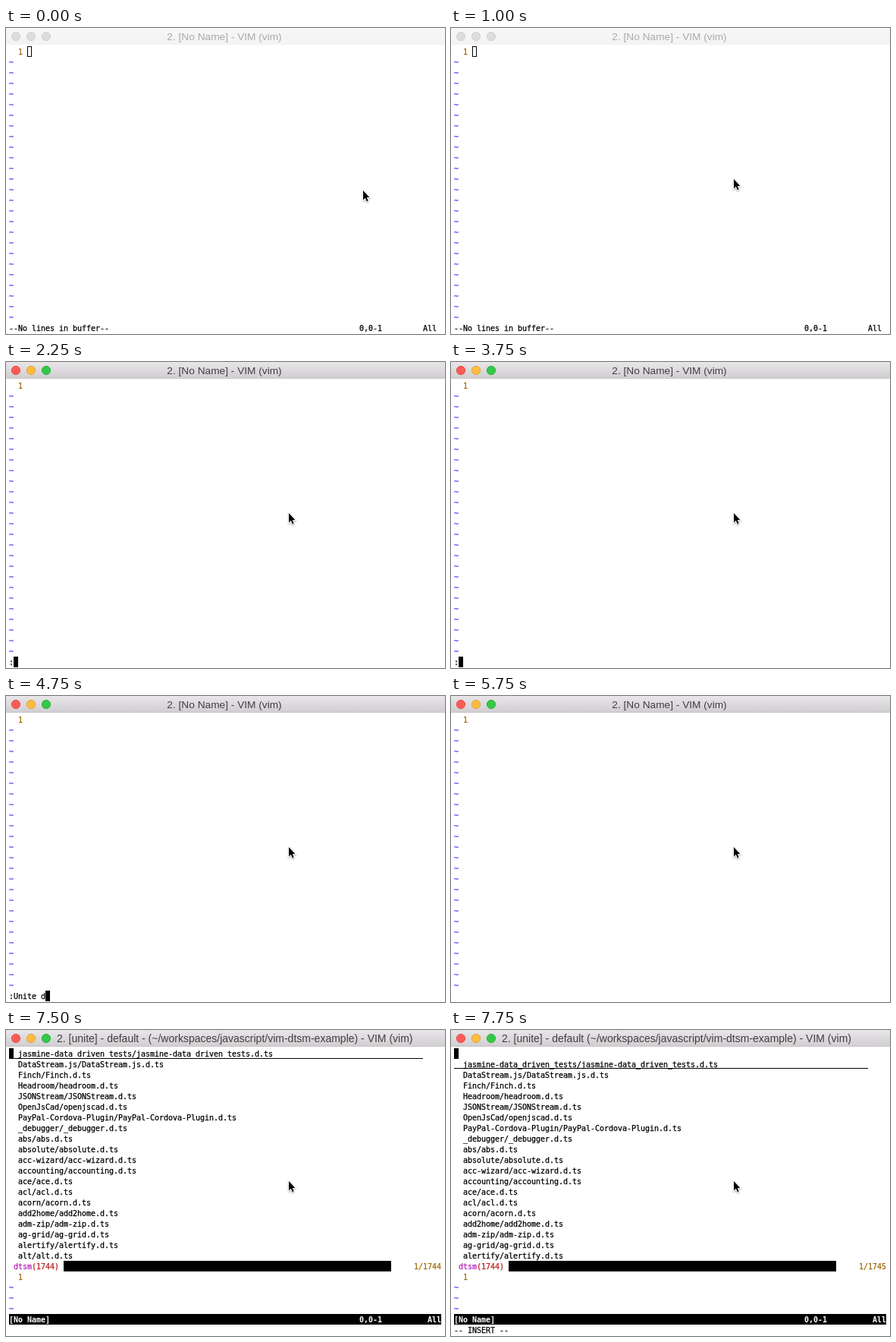
An HTML page with a canvas for the animation above (8000 ms loop, 579 by 403 pixels).

```html
<!DOCTYPE html>
<html lang="en">
<head>
<meta charset="utf-8">
<title>Vim session</title>
<style>
html, body { margin: 0; width: 100%; height: 100%; overflow: hidden; background: #fff; }
canvas { display: block; }
</style>
</head>
<body>
<canvas id="stage" width="579" height="403"></canvas>
<script>
const ctx = document.getElementById('stage').getContext('2d');
const LOOP = 8000, COLS = 95;
const BROWN = '#a06808', BLUE = '#4a40ff';
const MONO = '10px "DejaVu Sans Mono", monospace';

const same = name => `${name}/${name}.d.ts`;
const files = [
  same('jasmine-data_driven_tests'), same('DataStream.js'), same('Finch'),
  'Headroom/headroom.d.ts', same('JSONStream'), 'OpenJsCad/openjscad.d.ts',
  ...['PayPal-Cordova-Plugin', '_debugger', 'abs', 'absolute', 'acc-wizard',
    'accounting', 'ace', 'acl', 'acorn', 'add2home', 'adm-zip', 'ag-grid',
    'alertify', 'alt'].map(same)
];

// Each list holds [start time, value]; values change without easing.
const pointer = [[0, [470, 213]], [250, [437, 222]], [750, [419, 219]], [1000, [372, 198]]];
const command = [[0, null], [2250, ':'], [3000, ':u'], [3750, ':'], [4000, ':U'],
  [4250, ':Unite'], [4500, ':Unite '], [4750, ':Unite d'], [5500, ':Unite dtsm'], [5750, '']];
const path = '(~/workspaces/javascript/vim-dtsm-example) - VIM';
const titles = [[0, '2. [No Name] - VIM (vim)'], [6500, '2. [No Name] - VIM (git)'],
  [6750, `2. [unite] - default - ${path} (git)`],
  [7250, `2. [unite] - default - ${path} (vim)`],
  [7750, `2. [unite] - default ${path} (vim)`]];

const at = (steps, t) => steps.findLast(s => s[0] <= t)[1];
const colX = c => 4 + 6 * c;
const rowY = r => 24 + 14 * r;

function rect(x, y, w, h, color) {
  ctx.fillStyle = color;
  ctx.fillRect(x, y, w, h);
}

function block(col, row, count = 1) {
  rect(colX(col), rowY(row), 6 * count, 14, '#000');
}

// A hairline outline gives the terminal text its dense weight.
function print(text, col, row, color = '#000', bold = false) {
  ctx.font = (bold ? 'bold ' : '') + MONO;
  ctx.textAlign = 'left';
  ctx.fillStyle = ctx.strokeStyle = color;
  ctx.lineWidth = 0.25;
  [...text].forEach((ch, i) => {
    ctx.fillText(ch, colX(col + i), rowY(row) + 11);
    if (!bold) ctx.strokeText(ch, colX(col + i), rowY(row) + 11);
  });
}

function tildes(from, to) {
  for (let r = from; r <= to; r++) print('~', 0, r, BLUE);
}

function drawTitle(t) {
  const active = t >= 1250;
  const shade = ctx.createLinearGradient(0, 0, 0, 22);
  shade.addColorStop(0, active ? '#e8e6e8' : '#f7f7f7');
  shade.addColorStop(1, active ? '#d0cdd0' : '#f3f3f3');
  rect(0, 0, 579, 22, shade);
  if (active) rect(0, 21, 579, 1, '#c6c3c6');

  const lights = active
    ? [['#fc5b57', '#e2443f'], ['#fdbc40', '#e0a030'], ['#34c84a', '#24ab36']]
    : Array(3).fill(['#dcdcdc', '#cfcfcf']);
  lights.forEach(([fill, edge], i) => {
    ctx.beginPath();
    ctx.arc(13 + 20 * i, 11, 5.6, 0, 7);
    ctx.fillStyle = fill;
    ctx.fill();
    ctx.strokeStyle = edge;
    ctx.lineWidth = 0.9;
    ctx.stroke();
  });

  const text = at(titles, t), long = t >= 6750;
  ctx.font = `${long ? 14 : 13.7}px "Liberation Sans", Arial, sans-serif`;
  ctx.textAlign = long ? 'left' : 'center';
  ctx.fillStyle = active ? '#403e40' : '#aaa';
  ctx.fillText(text, long ? 67 : 288, 16);
}

function drawEditor(t) {
  print('1', 2, 0, BROWN);
  tildes(1, 25);
  const typed = at(command, t);
  if (typed === null) {
    if (t < 1250) {
      ctx.strokeStyle = '#000';
      ctx.lineWidth = 1;
      ctx.strokeRect(colX(4) + 0.5, rowY(0) + 0.5, 5, 13);
    } else block(4, 0);
    print('--No lines in buffer--', 0, 26);
    print('0,0-1', 77, 26);
    print('All', 91, 26);
  } else if (typed) {
    print(typed, 0, 26);
    block(typed.length, 26);
  }
}

function drawList(t) {
  const insert = t >= 7750, first = insert ? 1 : 0;
  files.slice(0, 20 - first).forEach((name, i) => print(name, 2, i + first));
  rect(4, rowY(first) + (insert ? 12 : 13), 546, 1, '#000');
  block(0, 0);

  print('dtsm', 1, 20, '#b81fb8');
  print('(1744)', 5, 20, '#bc2020');
  block(12, 20, 72);
  print(insert ? '1/1745' : '1/1744', 89, 20, BROWN);

  print('1', 2, 21, BROWN);
  tildes(22, 24);
  block(0, 25, COLS);
  print('[No Name]', 0, 25, '#fff', true);
  print('0,0-1', 77, 25, '#fff', true);
  print('All', 92, 25, '#fff', true);
  if (insert) print('-- INSERT --', 0, 26);
}

const arrow = new Path2D('M1 1V13.4L3.9 10.8L5.8 15.4L7.6 14.6L5.8 10.1H9.4Z');

function drawPointer([x, y]) {
  ctx.save();
  ctx.translate(x, y);
  ctx.shadowColor = 'rgba(0,0,0,.35)';
  ctx.shadowBlur = 2;
  ctx.shadowOffsetY = 1;
  ctx.strokeStyle = '#fff';
  ctx.lineWidth = 2;
  ctx.stroke(arrow);
  ctx.shadowColor = 'transparent';
  ctx.fillStyle = '#000';
  ctx.fill(arrow);
  ctx.restore();
}

function draw(now) {
  const t = now % LOOP;
  rect(0, 0, 579, 403, '#fff');
  drawTitle(t);
  (t < 6500 ? drawEditor : drawList)(t);
  drawPointer(at(pointer, t));
  requestAnimationFrame(draw);
}

draw(0);
</script>
</body>
</html>
```
